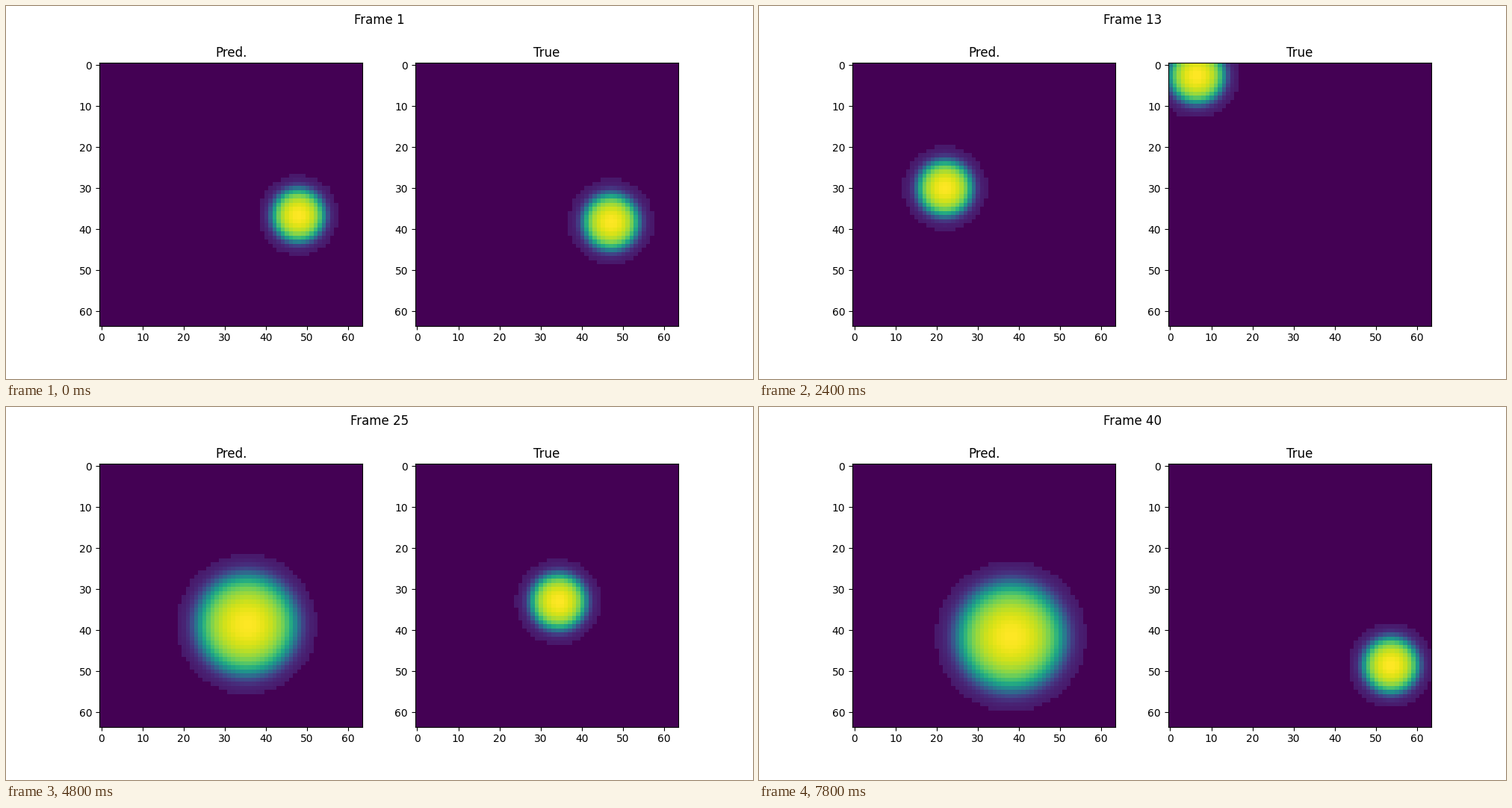
A matplotlib script that plays this animation: 1000 px wide and 500 px high, repeating every 8 s.

```python
import matplotlib.pyplot as plt
import numpy as np
from matplotlib.animation import FuncAnimation

SIZE = 64
FRAMES = 40
INTERVAL = 200
BALL_RADIUS = 10.4
RIM = 0.065  # faint level of the outer halo

rows, cols = np.mgrid[0:SIZE, 0:SIZE]

# Waypoints of the predicted ball: step, x, y
PATH = np.array([
    (1, 47.8, 36.6), (4, 29, 43), (8, 29.7, 7.7), (11, 10, 24), (13, 22, 30),
    (17, 52.4, 24.8), (25, 35.3, 38.6), (30, 12, 33), (34, 7.7, 30),
    (40, 38, 41.5),
])
STEPS, POINTS = PATH[:, 0], PATH[:, 1:]
SLOPES = np.gradient(POINTS, STEPS, axis=0)


def sigmoid(v):
    return 1 / (1 + np.exp(-v))


def glide(step):
    """Cubic Hermite curve through the waypoints."""
    i = min(np.searchsorted(STEPS, step, side="right") - 1, len(STEPS) - 2)
    h = STEPS[i + 1] - STEPS[i]
    t = (step - STEPS[i]) / h
    return ((1 + 2 * t) * (1 - t) ** 2 * POINTS[i]
            + t * (1 - t) ** 2 * h * SLOPES[i]
            + t * t * (3 - 2 * t) * POINTS[i + 1]
            + t * t * (t - 1) * h * SLOPES[i + 1])


def bounce(pos, limit=SIZE - 1):
    """Fold a straight path back and forth between the walls."""
    pos = pos % (2 * limit)
    return min(pos, 2 * limit - pos)


def predicted(step):
    """The prediction drifts and blurs into a wider ball over time."""
    x, y = glide(step)
    return x, y, 9.8 + 8.5 * sigmoid((step - 20.5) / 2.6)


def true_ball(step):
    k = step - 1
    return bounce(47 + 7.115 * k), bounce(38.2 - 2.968 * k), BALL_RADIUS


def blob(x, y, radius):
    u = np.hypot(cols - x, rows - y) / radius
    edge = np.interp(radius, (11, 17), (0.68, 0.74))
    core = (1 - 0.75 * u ** 2) * sigmoid((edge - u) / 0.07)
    img = np.where(u < 1, RIM + (1 - RIM) * core, 0)
    return img / img.max()


fig, axes = plt.subplots(1, 2, figsize=(10, 5), dpi=100)
title = fig.suptitle("Frame 1")
sources = (predicted, true_ball)
images = []
for ax, name, source in zip(axes, ("Pred.", "True"), sources):
    ax.set_title(name)
    images.append(ax.imshow(blob(*source(1)), cmap="viridis", vmin=0, vmax=1))


def update(i):
    step = i + 1
    title.set_text(f"Frame {step}")
    for image, source in zip(images, sources):
        image.set_data(blob(*source(step)))
    return [title, *images]


anim = FuncAnimation(fig, update, frames=FRAMES, interval=INTERVAL,
                     repeat=True, repeat_delay=0, blit=False)
plt.show()
```
